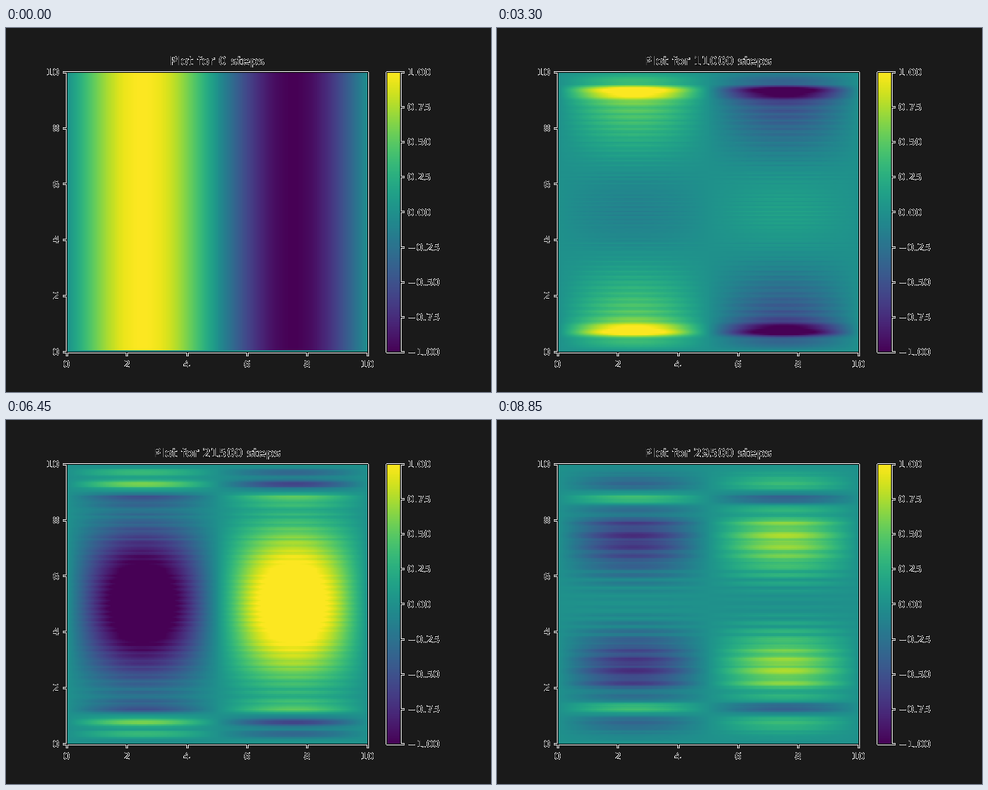
Animation, 640 px wide and 480 px high, one loop 9000 ms. Source, as an HTML page with a canvas:

```html
<!DOCTYPE html>
<html lang="en">
<head>
<meta charset="utf-8">
<title>Wave plot</title>
<style>
html, body { margin: 0; width: 100%; height: 100%; overflow: hidden; background: #1a1a1a; }
canvas { display: block; }
</style>
</head>
<body>
<canvas id="stage" width="640" height="480"></canvas>
<script>
const FRAME_MS = 150, FRAMES = 60, STEPS = 500, DT = 0.001;
const N = 200, SIZE = 10, DX = SIZE / N;
const BACK = 26;
const LEFT = 80, RIGHT = 476.8, TOP = 57.6, BOTTOM = 427.2;
const BAR_LEFT = 501.6, BAR_RIGHT = 520.08;
const LINE = 1.11;

const ctx = document.getElementById('stage').getContext('2d', { willReadFrequently: true });
const grid = document.createElement('canvas');
grid.width = grid.height = N;
const gridCtx = grid.getContext('2d');
const cells = gridCtx.createImageData(N, N);

// Polynomial fit of the viridis colour map, one row per channel
const VIRIDIS = [
  [0.27773, 0.10509, -0.33086, -4.63423, 6.22827, 4.77638, -5.43546],
  [0.00541, 1.40461, 0.21485, -5.7991, 14.17993, -13.74515, 4.64585],
  [0.3341, 1.38459, 0.0951, -19.33244, 56.69055, -65.35303, 26.31244]
];
const palette = Array.from({ length: 256 }, (_, i) =>
  VIRIDIS.map(c => Math.round(255 * c.reduceRight((sum, k) => sum * i / 255 + k, 0))));
const colour = v => palette[Math.max(0, Math.min(255, Math.floor((v + 1) * 128)))];

// Standing modes of the wave equation on a grid with fixed edges
const stiffness = n => (2 / DX * Math.sin(n * Math.PI / (2 * N))) ** 2;
const modes = [];
for (let n = 1; n < N; n += 2) {
  modes.push({
    n,
    amp: 2 / N / Math.tan(n * Math.PI / (2 * N)),
    omega: Math.sqrt(stiffness(2) + stiffness(n))
  });
}
const sines = Array.from({ length: 2 * N }, (_, i) => Math.sin(i * Math.PI / N));
const wave = Array.from({ length: N }, (_, i) => sines[2 * i]);

function drawField(time) {
  const weights = modes.map(m => m.amp * Math.cos(m.omega * time));
  for (let row = 0; row < N; row++) {
    const height = modes.reduce((sum, m, i) => sum + weights[i] * sines[m.n * row % (2 * N)], 0);
    for (let col = 0; col < N; col++) {
      const at = 4 * ((N - 1 - row) * N + col);
      cells.data.set(colour(height * wave[col]), at);
      cells.data[at + 3] = 255;
    }
  }
  gridCtx.putImageData(cells, 0, 0);
  ctx.imageSmoothingEnabled = false;
  ctx.drawImage(grid, 80, 58, 397, 369);
}

function drawBar() {
  for (let y = 58; y < 427; y++) {
    ctx.fillStyle = `rgb(${colour(1 - 2 * (y + 0.5 - TOP) / (BOTTOM - TOP))})`;
    ctx.fillRect(502, y, 18, 1);
  }
}

const snap = v => Math.floor(v + 0.5) + 0.5;
const hLine = (x0, x1, y) => ctx.fillRect(x0, snap(y) - LINE / 2, x1 - x0, LINE);
const vLine = (x, y0, y1) => ctx.fillRect(snap(x) - LINE / 2, y0, LINE, y1 - y0);

function box(x0, x1) {
  const a = snap(x0) - LINE / 2, b = snap(x1) + LINE / 2;
  hLine(a, b, TOP);
  hLine(a, b, BOTTOM);
  vLine(x0, snap(TOP), snap(BOTTOM));
  vLine(x1, snap(TOP), snap(BOTTOM));
}

function label(text, x, y, align) {
  ctx.textAlign = align;
  ctx.fillText(text, x, Math.round(y));
}

function drawAxes(steps) {
  ctx.fillStyle = '#000';
  box(LEFT, RIGHT);
  box(BAR_LEFT, BAR_RIGHT);
  ctx.font = '13.889px "DejaVu Sans", sans-serif';
  for (let i = 0; i <= 5; i++) {
    const x = LEFT + (RIGHT - LEFT) * i / 5;
    const y = BOTTOM - (BOTTOM - TOP) * i / 5;
    vLine(x, 427.5, 432.5);
    hLine(75.5, 80.5, y);
    label(2 * i, x, 448, 'center');
    label(2 * i, 70.3, y + 5.1, 'right');
  }
  for (let i = 0; i <= 8; i++) {
    const y = BOTTOM - (BOTTOM - TOP) * i / 8;
    hLine(520.5, 525.5, y);
    label((i / 4 - 1).toFixed(2).replace('-', '\u2212'), 529.8, y + 5.1, 'left');
  }
  ctx.font = '16.667px "DejaVu Sans", sans-serif';
  label(`Plot for ${steps} steps`, (LEFT + RIGHT) / 2, 49, 'center');
}

// Soft edges blend into white, while untouched pixels take the dark backdrop
function flatten() {
  const img = ctx.getImageData(0, 0, 640, 480), d = img.data;
  for (let i = 0; i < d.length; i += 4) {
    const a = d[i + 3] / 255;
    for (let c = i; c < i + 3; c++) d[c] = a ? d[c] * a + 255 * (1 - a) : BACK;
    d[i + 3] = 255;
  }
  ctx.putImageData(img, 0, 0);
}

let shown = -1;
const start = performance.now();

function tick() {
  const frame = Math.floor((performance.now() - start) / FRAME_MS) % FRAMES;
  if (frame !== shown) {
    shown = frame;
    const steps = frame * STEPS;
    ctx.clearRect(0, 0, 640, 480);
    drawField(steps * DT);
    drawBar();
    drawAxes(steps);
    flatten();
  }
  requestAnimationFrame(tick);
}
tick();
</script>
</body>
</html>
```
